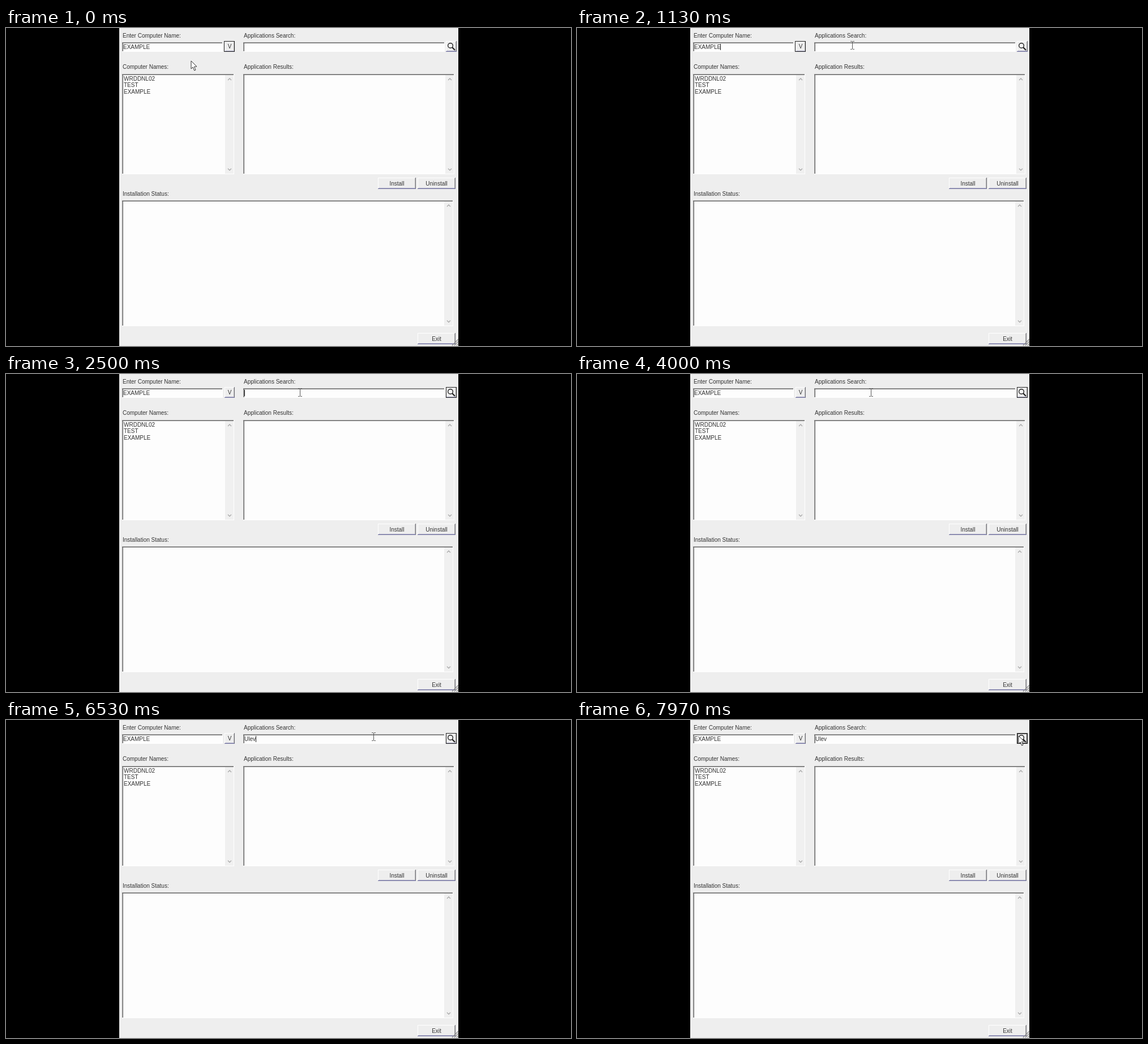
An HTML page with a canvas for the animation above (8 s loop, 998 px wide and 561 px high).

```html
<!DOCTYPE html>
<html lang="en">
<head>
<meta charset="utf-8">
<title>Software installer</title>
<style>
html, body { margin: 0; width: 100%; height: 100%; overflow: hidden; background: #000; }
canvas { display: block; }
</style>
</head>
<body>
<canvas id="stage" width="998" height="561"></canvas>
<script>
const ctx = document.getElementById('stage').getContext('2d');
const LOOP = 8000;
const BLINK = 530;
const FACE = '#eeeeee';
const FIELD = '#fdfdfd';
const INK = '#333333';
const QUERY = 'Ulev';
const KEY_TIMES = [4500, 4700, 5000, 5140];
const SEARCH_FOCUS = 2270;
const PRESS = 7730;

// Pointer path: time, x, y
const PATH = [
  [330, 327, 58], [1130, 486, 30], [1830, 519, 32],
  [6130, 519, 32], [6930, 779, 27], [7070, 780, 28]
];

function rect(x, y, w, h, color) {
  ctx.fillStyle = color;
  ctx.fillRect(x, y, w, h);
}

function line(points, color, width = 1) {
  ctx.beginPath();
  points.forEach(([x, y]) => ctx.lineTo(x, y));
  ctx.strokeStyle = color;
  ctx.lineWidth = width;
  ctx.stroke();
}

function text(str, x, y, align = 'left') {
  ctx.font = '10px "Liberation Sans", Arial, sans-serif';
  ctx.textAlign = align;
  ctx.fillStyle = INK;
  ctx.fillText(str, x, y);
}

function sunken(x, y, w, h) {
  rect(x, y, w, h, FIELD);
  rect(x, y, w, 1, '#a0a0a0');
  rect(x, y, 1, h, '#a0a0a0');
  rect(x, y + 1, w - 1, 1, '#686868');
  rect(x + 1, y + 1, 1, h - 2, '#686868');
  rect(x + w - 1, y, 1, h, '#ffffff');
  rect(x, y + h - 1, w, 1, '#ffffff');
}

function chevron(x, y, dir) {
  line([[x - 3, y + 1.5 * dir], [x, y - 1.5 * dir], [x + 3, y + 1.5 * dir]], '#a8a8a8', 1.3);
}

function listBox(x, y, w, h) {
  sunken(x, y, w, h);
  rect(x + w - 16, y + 2, 15, h - 3, '#f0f0f0');
  chevron(x + w - 8, y + 9.5, 1);
  chevron(x + w - 8, y + h - 8.5, -1);
}

function button(x, y, w, h, label) {
  rect(x, y, w, h, FACE);
  rect(x, y, w, 1, '#ffffff');
  rect(x, y, 1, h, '#ffffff');
  rect(x + w - 2, y + 1, 1, h - 2, '#b4b4b4');
  rect(x + w - 1, y, 1, h, '#707078');
  rect(x + 1, y + h - 2, w - 2, 1, '#a6a6c4');
  rect(x, y + h - 1, w, 1, '#7474a0');
  if (label) text(label, x + w / 2, y + h / 2 + 3.5, 'center');
}

function outline(x, y, w, h, color) {
  ctx.strokeStyle = color;
  ctx.lineWidth = 1;
  ctx.strokeRect(x + 0.5, y + 0.5, w - 1, h - 1);
}

function magnifier(x, y) {
  ctx.beginPath();
  ctx.arc(x, y, 4.3, 0, Math.PI * 2);
  ctx.fillStyle = '#f8f8f8';
  ctx.fill();
  ctx.strokeStyle = '#222222';
  ctx.lineWidth = 1.4;
  ctx.stroke();
  line([[x + 3, y + 3], [x + 8, y + 8]], '#222222', 2.2);
}

function smallButtons(t) {
  const searching = t >= SEARCH_FOCUS;
  button(386, 23, 18, 19, 'V');
  button(777, 23, 19, 19);
  outline(searching ? 777 : 385, 23, 19, 19, '#222222');
  const pressed = t >= PRESS;
  if (pressed) outline(778, 24, 17, 17, '#555555');
  magnifier(785, 31);
}

function grip() {
  for (const d of [3, 7, 11]) {
    line([[799 - d, 560], [799, 560 - d]], '#8a8a8a', 1.3);
  }
}

function panel() {
  rect(0, 0, 998, 561, '#000000');
  rect(200, 0, 599, 561, FACE);
  text('Enter Computer Name:', 206, 17);
  text('Applications Search:', 420, 17);
  text('Computer Names:', 206, 72);
  text('Application Results:', 420, 72);
  text('Installation Status:', 206, 296);
  sunken(205, 25, 178, 17);
  sunken(419, 25, 356, 17);
  listBox(205, 81, 198, 177);
  listBox(419, 81, 373, 177);
  listBox(205, 304, 585, 222);
  text('EXAMPLE', 207, 37);
  ['WRDDNL02', 'TEST', 'EXAMPLE'].forEach((name, i) => text(name, 208, 92.5 + i * 11.5));
  button(657, 264, 67, 20, 'Install');
  button(727, 264, 67, 20, 'Uninstall');
  button(727, 538, 67, 20, 'Exit');
  grip();
}

function caret(x) {
  rect(Math.round(x), 28, 1, 11, '#222222');
}

function searchField(t) {
  const typed = KEY_TIMES.filter(k => t >= k);
  const value = QUERY.slice(0, typed.length);
  text(value, 421, 37);
  if (t < SEARCH_FOCUS) {
    if (t >= 600) caret(252.5);
    return;
  }
  const since = t - (typed.length ? typed[typed.length - 1] : SEARCH_FOCUS);
  if (Math.floor(since / BLINK) % 2 === 0) caret(421 + ctx.measureText(value).width);
}

function pointerAt(t) {
  const next = PATH.findIndex(p => t < p[0]);
  if (next === 0) return PATH[0].slice(1);
  if (next < 0) return PATH[PATH.length - 1].slice(1);
  const [t0, x0, y0] = PATH[next - 1];
  const [t1, x1, y1] = PATH[next];
  const u = (t - t0) / (t1 - t0);
  const e = u * u * (3 - 2 * u);
  return [x0 + (x1 - x0) * e, y0 + (y1 - y0) * e];
}

function arrow(x, y) {
  ctx.beginPath();
  [[0, 0], [0, 14], [3.2, 11], [5.7, 17], [8, 16], [5.5, 10.2], [10, 10]]
    .forEach(([dx, dy]) => ctx.lineTo(x + dx, y + dy));
  ctx.closePath();
  ctx.fillStyle = '#ffffff';
  ctx.fill();
  ctx.strokeStyle = '#333333';
  ctx.lineWidth = 1;
  ctx.stroke();
}

function iBeam(x, y) {
  x = Math.round(x);
  y = Math.round(y);
  rect(x, y - 6, 1, 13, '#555555');
  for (const dy of [-7, 7]) {
    rect(x - 3, y + dy, 3, 1, '#666666');
    rect(x + 1, y + dy, 3, 1, '#666666');
  }
}

function pointer(t) {
  // Typing hides the pointer until it moves again
  if (t >= KEY_TIMES[0] && t < 6130) return;
  const [x, y] = pointerAt(t);
  const overField = y >= 25 && y <= 42 && x >= 419 && x < 775;
  (overField ? iBeam : arrow)(x, y);
}

function draw(now) {
  const t = now % LOOP;
  panel();
  smallButtons(t);
  searchField(t);
  pointer(t);
}

const start = performance.now();
function tick() {
  draw(performance.now() - start);
  requestAnimationFrame(tick);
}
tick();
</script>
</body>
</html>
```
